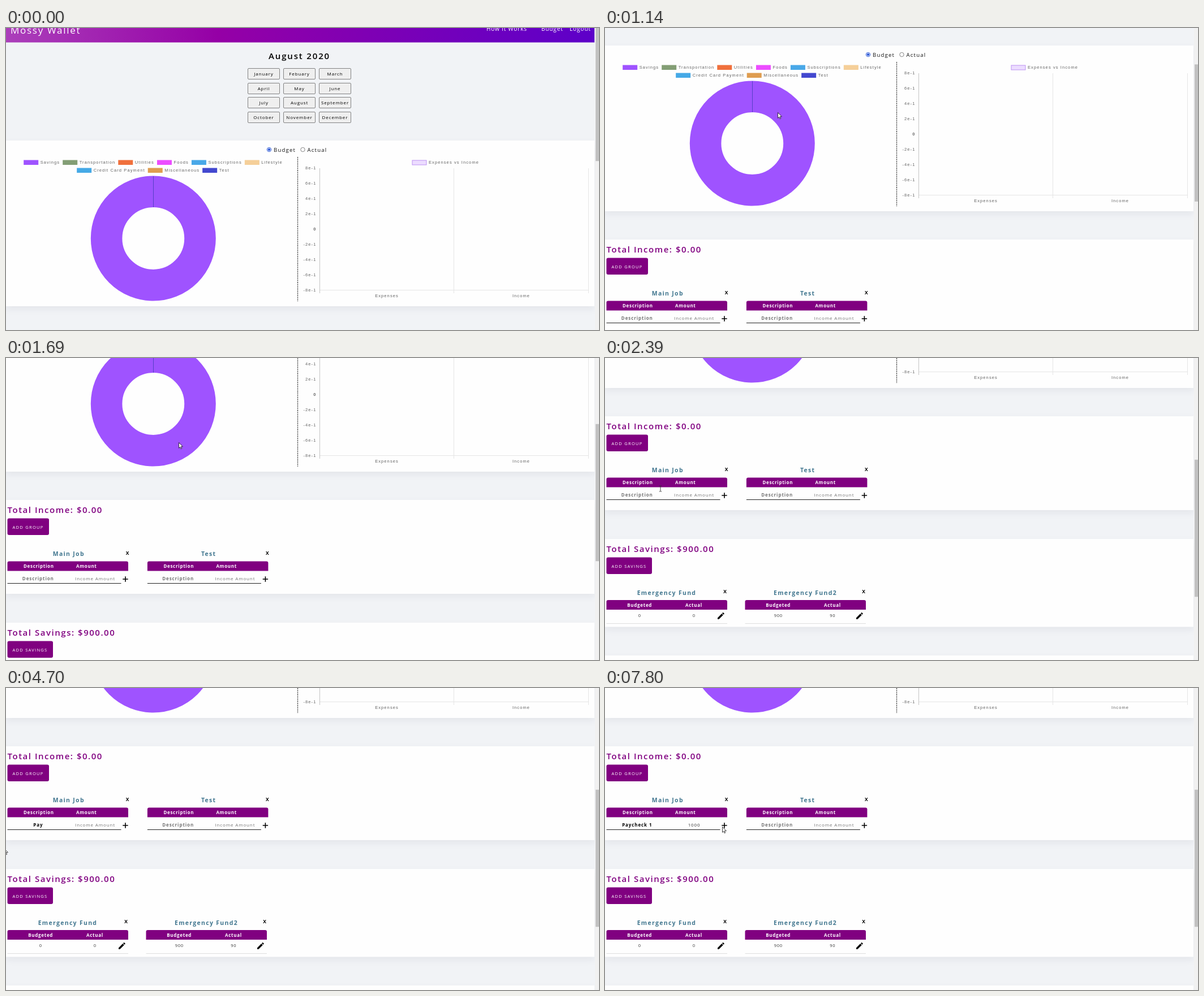
These frames come from a looping animation (1048 by 534 pixels, 8000 ms). An HTML page:

```html
<!DOCTYPE html>
<html lang="en">
<head>
<meta charset="utf-8">
<title>Monthly budget</title>
<style>
  html, body { margin: 0; width: 100%; height: 100%; overflow: hidden; background: #f1f3f6; }
  svg { display: block; width: 1048px; height: 534px; }
  text { font-family: "Open Sans", "Noto Sans", sans-serif; white-space: pre; }
  .mid { text-anchor: middle; }
  .end { text-anchor: end; }
  .brand { font-size: 17px; letter-spacing: 1.7px; fill: #fff; }
  .nav { font-size: 10.2px; font-weight: 500; letter-spacing: .75px; fill: #fff; }
  .heading { font-size: 15px; font-weight: 600; letter-spacing: 1.85px; fill: #000; }
  .month { font-size: 8px; letter-spacing: .88px; fill: #000; }
  .radio { font-size: 9.5px; letter-spacing: 1.25px; fill: #111; }
  .chart { font-family: "Liberation Sans", Arial, sans-serif; font-size: 7.5px; letter-spacing: 1.1px; fill: #666; }
  .zero { font-weight: 700; }
  .total { font-size: 15px; font-weight: 600; letter-spacing: 1.53px; fill: #800080; }
  .add { font-size: 7.6px; letter-spacing: 1.22px; fill: #fff; }
  .group { font-size: 10.5px; font-weight: 700; letter-spacing: 1.3px; fill: #41768f; }
  .close { font-size: 8.5px; font-weight: 700; fill: #000; }
  .column { font-size: 8px; font-weight: 700; letter-spacing: .7px; fill: #fff; }
  .name { font-size: 8px; font-weight: 700; letter-spacing: .9px; fill: #757575; }
  .amount { font-size: 8px; letter-spacing: .85px; fill: #757575; }
  .value { font-size: 7.5px; letter-spacing: .7px; fill: #333; }
  .panel { fill: #fefefe; filter: drop-shadow(0 5px 6px rgba(20, 20, 50, .06)); }
  .purple { fill: #800080; }
</style>
</head>
<body>
<svg viewBox="0 0 1048 534">
  <defs>
    <linearGradient id="bar">
      <stop offset="0" stop-color="#ab3fba"/>
      <stop offset=".36" stop-color="#9500a6"/>
      <stop offset="1" stop-color="#5d00c9"/>
    </linearGradient>
  </defs>
  <rect width="1048" height="534" fill="#f1f3f6"/>
  <g id="page"></g>
  <rect x="1041" width="7" height="534" fill="#f1f1f1"/>
  <rect id="thumb" x="1042" width="6" height="242.5" fill="#c1c1c1"/>
  <path id="arrow" d="M.5.5V10.3L2.7 8.3 4.2 11.7 5.7 11 4.2 7.7H7.4Z" fill="#fff" stroke="#111" stroke-width=".8"/>
  <path id="beam" d="M-2.2-5H-.5L0-4.5 .5-5H2.2M0-4.5V4.5M-2.2 5H-.5L0 4.5 .5 5H2.2" fill="none" stroke="#333" stroke-width=".9"/>
</svg>
<script>
const $ = id => document.getElementById(id);
const page = $('page');

function add(tag, attrs) {
  const el = document.createElementNS('http://www.w3.org/2000/svg', tag);
  for (const key in attrs) el.setAttribute(key, attrs[key]);
  return page.appendChild(el);
}
function text(x, y, str, cls) {
  const el = add('text', { x, y, class: cls });
  el.textContent = str;
  return el;
}
// the half pixel offsets the letter spacing after the last glyph
const mid = (x, y, str, cls) => text(x + .5, y, str, cls + ' mid');
const rect = (x, y, width, height, more) => add('rect', { x, y, width, height, ...more });
const line = (d, stroke, more) => add('path', { d, stroke, fill: 'none', ...more });
const panel = (top, bottom) => rect(0, top, 1040, bottom - top, { class: 'panel' });

// Top bar
rect(0, -20, 1040, 45.5, { fill: 'url(#bar)' });
text(8, 10, 'Mossy Wallet', 'brand');
text(849, 5, 'How It Works', 'nav');
text(946, 5, 'Budget', 'nav');
text(996, 5, 'Logout', 'nav');

// Month picker
mid(518, 55, 'August 2020', 'heading');
['January', 'Febuary', 'March', 'April', 'May', 'June', 'July', 'August',
 'September', 'October', 'November', 'December'].forEach((month, i) => {
  const x = 427.5 + i % 3 * 63, y = 71.5 + Math.round(Math.floor(i / 3) * 25.7);
  rect(x, y, 56, 19, { rx: 1.5, fill: '#efefef', stroke: '#767676', 'stroke-width': .9 });
  mid(x + 27.5, y + 12.6, month, 'month');
});

// Chart panel
panel(199, 492);
add('circle', { cx: 465, cy: 215, r: 3.7, fill: '#fff', stroke: '#2f5bd8' });
add('circle', { cx: 465, cy: 215, r: 2.3, fill: '#2f5bd8' });
add('circle', { cx: 524.5, cy: 215, r: 3.7, fill: '#fff', stroke: '#767676', 'stroke-width': .9 });
text(473, 218.7, 'Budget', 'radio');
text(532.5, 218.7, 'Actual', 'radio');

// One centred row of swatches, each followed by its label
function legend(y, items) {
  const swatch = 29.5, gap = 5.1;
  const labels = Object.keys(items).map(label => text(0, y + 6.5, label, 'chart'));
  const widths = labels.map(el => swatch + el.getComputedTextLength());
  let x = 260 - (widths.reduce((sum, w) => sum + w + gap, -gap)) / 2;
  labels.forEach((el, i) => {
    rect(x, y, 26, 8.5, { fill: items[el.textContent] });
    el.setAttribute('x', x + swatch);
    x += widths[i] + gap;
  });
}
legend(233.5, {
  Savings: '#9f53ff', Transportation: '#839e75', Utilities: '#f0703c',
  Foods: '#ec4dff', Subscriptions: '#49a8e8', Lifestyle: '#f5cf99'
});
legend(247.5, { 'Credit Card Payment': '#45a9e6', Miscellaneous: '#df9d50', Test: '#4348cf' });

add('circle', { cx: 260.3, cy: 372, r: 82.7, fill: 'none', stroke: '#9f53ff', 'stroke-width': 55.6 });
line('M260.5 262V317', '#5540c8');
line('M515.5 228V483', '#222', { 'stroke-width': 1.3, 'stroke-dasharray': '1.8 1.5' });

rect(718, 234, 25, 8, { fill: '#ecdcff', stroke: '#bd92f2' });
text(747, 240, 'Expenses vs Income', 'chart');
for (let n = 8; n >= -8; n -= 2) {
  text(548.5, 357.7 - 13.5 * n, n ? n + 'e-1' : '0', 'chart end' + (n ? '' : ' zero'));
}
line('M791.5 248V469M1029.5 248V469M554 463.5H1030', '#e5e5e5');
line('M554.5 248V469', '#c4c4c4');
mid(672.5, 476, 'Expenses', 'chart');
mid(910, 476, 'Income', 'chart');

// Shared parts of both lists
function section(top, bottom, total, label, width) {
  panel(top, bottom);
  text(2.5, top + 22.5, total, 'total');
  rect(2.5, top + 32.5, width, 29.5, { rx: 3, class: 'purple' });
  text(11.5, top + 50.6, label, 'add');
}
function tableHead(x, y, title, titleX, closeX) {
  mid(titleX, y - 9.5, title, 'group');
  mid(closeX - .5, y - 12, 'X', 'close');
  add('path', { d: `M${x} ${y + 17}v-14q0-3 3-3h207.5q3 0 3 3v14z`, class: 'purple' });
}

// Income
section(542, 708, 'Total Income: $0.00', 'ADD GROUP', 73.5);
const [fields] = ['Main Job', 'Test'].map((title, i) => {
  const dx = 247.4 * i;
  tableHead(2.5 + dx, 650.5, title, 110.3 + dx, 214.5 + dx);
  text(31 + dx, 662.4, 'Description', 'column');
  text(124 + dx, 662.4, 'Amount', 'column');
  line(`M${2.5 + dx} 689.5h201`, '#222');
  line(`M${206.3 + dx} 682h9.4m-4.7-4.7v9.4`, '#000', { 'stroke-width': 1.6 });
  return {
    name: mid(56.3 + dx, 684, 'Description', 'name'),
    amount: mid(157 + dx, 684, 'Income Amount', 'amount')
  };
});
const caret = rect(0, 675, 1, 11, { fill: '#000' });

// Savings
section(759, 914.5, 'Total Savings: $900.00', 'ADD SAVINGS', 80.5);
[['Emergency Fund', 0, 0], ['Emergency Fund2', 900, 90]].forEach(([title, budgeted, actual], i) => {
  const dx = 245 * i;
  tableHead(2.5 + dx, 867, title, 108.5 + dx, 212 + dx);
  mid(60.7 + dx, 879, 'Budgeted', 'column');
  mid(156.5 + dx, 879, 'Actual', 'column');
  mid(60.7 + dx, 897, budgeted, 'value');
  mid(156.7 + dx, 897, actual, 'value');
  line(`M${2.5 + dx} 908.5h213.5`, '#dedede');
  add('path', {
    d: 'M3 17.25V21h3.75L17.8 9.95 14.05 6.2zM20.7 7a1 1 0 0 0 0-1.4L18.4 3.3a1 1 0 0 0-1.4 0L15.1 5.1l3.8 3.8z',
    transform: `translate(${197 + dx} 887) scale(.66)`
  });
});
panel(965, 1100);

// Motion
const LOOP = 8000, TICK = 77, BLINK = 535;

function easeOut(t, start, end) {
  const u = Math.min(1, Math.max(0, (t - start) / (end - start)));
  return 1 - (1 - u) ** 2;
}
const scrollAt = t => Math.round(220 * easeOut(t, 884, 1260) + 219 * easeOut(t, 1467.6, 2310));

// Each move: start, end, and where the pointer comes to rest
const moves = [
  [70, 750, 305, 149], [1800, 2310, 93, 218], [2310, 2387, 98, 231], [2620, 3160, -4, 283],
  [5790, 6330, 155, 242], [6490, 6699, 135, 263], [7390, 7777, 207, 245]
];
function pointerAt(t) {
  let x = 905, y = 512;
  for (const [start, end, toX, toY] of moves) {
    const k = easeOut(t, start, end);
    x += (toX - x) * k;
    y += (toY - y) * k;
  }
  return [Math.round(x), Math.round(y)];
}

// Characters of one typing run
const typed = (t, start, every, most) =>
  Math.max(0, Math.min(most, 1 + Math.floor((t - start) / every)));

function fill(el, str, count, hint, color) {
  el.textContent = count ? str.slice(0, count) : hint;
  el.style.fill = count ? color : '';
  return count ? el.getComputedTextLength() / 2 : 0;
}

function draw(now) {
  const t = Math.floor(now % LOOP / TICK) * TICK;
  const scroll = scrollAt(t);
  page.setAttribute('transform', `translate(0 ${-scroll})`);
  $('thumb').setAttribute('y', -7.2 + scroll * .426);

  const nameCount = typed(t, 3850, 190, 3) + typed(t, 4770, 105, 7);
  const nameHalf = fill(fields.name, 'Paycheck 1', nameCount, 'Description', '#000');
  const amountHalf = fill(fields.amount, '1000', typed(t, 6930, 100, 4), 'Income Amount', '#333');

  const blink = Math.floor((t - 2770) / BLINK);
  caret.setAttribute('x', Math.round(t < 6490 ? 56 + nameHalf : 156.5 + amountHalf));
  caret.setAttribute('visibility', blink >= 0 && blink % 2 === 0 ? 'visible' : 'hidden');

  const [x, y] = pointerAt(t);
  const row = y + scroll;
  const overField = x > 2 && x < 203 && row > 668 && row < 689;
  const shown = { arrow: t > 0 && !overField, beam: t > 0 && overField };
  for (const id in shown) {
    $(id).setAttribute('transform', `translate(${x} ${y})`);
    $(id).setAttribute('visibility', shown[id] ? 'visible' : 'hidden');
  }
}
function loop() {
  draw(performance.now());
  requestAnimationFrame(loop);
}
loop();
</script>
</body>
</html>
```
